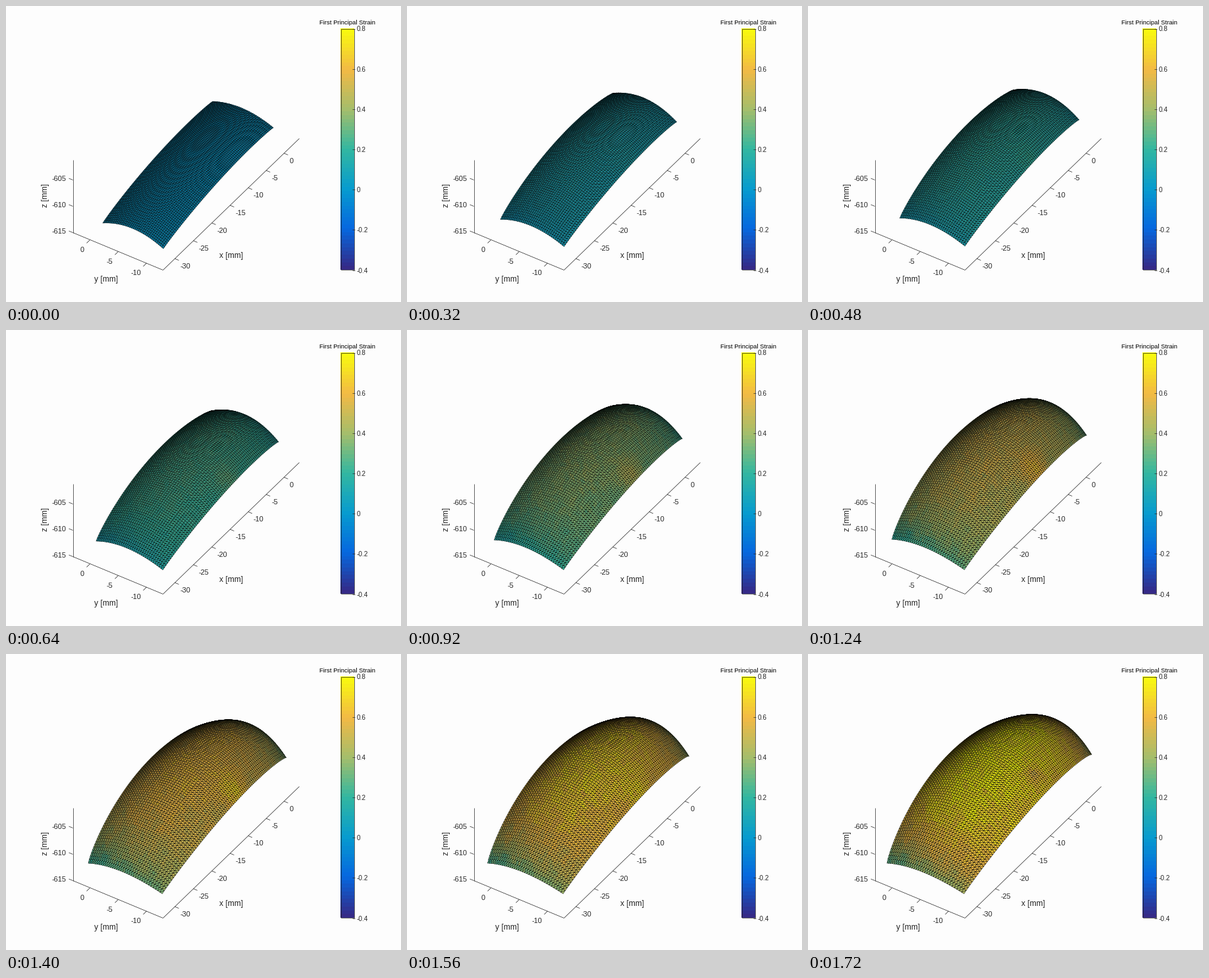
A matplotlib script for the animation above (1760 ms loop, 600 by 450 pixels).

```python
import numpy as np
import matplotlib.pyplot as plt
from matplotlib.animation import FuncAnimation
from matplotlib.collections import PolyCollection
from matplotlib.colors import LinearSegmentedColormap
from matplotlib.patches import Rectangle

W, H, DPI = 600, 450, 100
FRAMES, STEP = 44, 40
INK = "#262626"
NS, NV = 84, 36          # cells along and across the sheet

parula = LinearSegmentedColormap.from_list("parula", [
    "#352a87", "#0668e0", "#079ccf", "#33b8a1", "#a5be6b", "#f3ba45",
    "#f9fb0e"], N=64)

plt.rcParams["font.family"] = "Liberation Sans"
fig = plt.figure(figsize=(W / DPI, H / DPI), dpi=DPI, facecolor="#fdfdfd")
ax = fig.add_axes([0, 0, 1, 1])
ax.axis("off")


def px(n):
    return n * 72 / DPI


def line(x0, y0, x1, y1, width=0.7):
    ax.plot([x0 + .5, x1 + .5], [y0 + .5, y1 + .5], color=INK, lw=px(width),
            solid_capstyle="butt")


def label(x, y, s, size=11, ha="center", va="center_baseline", **kw):
    kw.setdefault("color", INK)
    ax.text(x, y, s, fontsize=px(size), ha=ha, va=va, **kw)


def draw_axes():
    line(101, 233, 101, 344)
    line(101, 344, 238, 401)
    line(238, 401, 445, 201)
    for i in range(7):
        x = 256 + 28.3 * i - 0.11 * i * i
        y = 401 - (x - 238) * 200 / 207
        line(x, y, x + 6, y + 2.5)
        label(x + 8.5, y + 11.5, f"{5 * i - 30}", ha="left")
    for i in range(3):
        x, y = 127 + 43 * i, 355 + 17.7 * i
        line(x, y, x - 5, y + 5)
        label(x - 8, y + 15, f"{-5 * i}", ha="right")
        z = 264 + 40 * i
        line(101, z, 95, z - 2.5)
        label(92, z - 2, f"{-605 - 5 * i}", ha="right")
    label(342, 379, "x [mm]", 12)
    label(152, 415, "y [mm]", 12)
    label(59.5, 288, "z [mm]", 12, va="center", rotation=90)


def draw_colorbar():
    x0, x1, y0, y1 = 508, 529, 34, 401
    ax.imshow(np.linspace(.8, -.4, 64)[:, None], cmap=parula, aspect="auto",
              extent=(x0, x1, y1, y0), interpolation="nearest")
    ax.add_patch(Rectangle((x0 + .5, y0 + .5), x1 - x0 - 1, y1 - y0 - 1,
                           fill=False, ec=INK, lw=px(.7)))
    for i in range(7):
        y = y0 + i * (y1 - y0) / 6
        line(x1 - 4, y, x1, y)
        label(533, y + .5, f"{(4 - i) / 5:g}", 10, ha="left")
    label(519, 25, "First Principal Strain", 9.5, color="black")


def ease_out(t, power):
    return 1 - (1 - t) ** power


def mix(q, a, b):
    return a + (b - a) * q


s, v = np.meshgrid(np.linspace(0, 1, NS + 1), np.linspace(0, 1, NV + 1),
                   indexing="ij")
arc_s, arc_v = (4 * s * (1 - s)) ** .85, 4 * v * (1 - v)


def surface(t):
    """Screen position of every mesh node."""
    q = t ** .83
    a = np.array([147 - 27 * t, 330 - 12 * ease_out(t, 3)])
    b = np.array([239 - 2 * t, 369 - 4.5 * ease_out(t, 6)])
    c = np.array([406 + 25 * t ** 1.15, 185 - 32 * t ** .77])
    d = a + c - b + (2 * q, -1 - 6 * q)

    S, V = s[..., None], v[..., None]
    p = (1 - S) * ((1 - V) * a + V * b) + S * ((1 - V) * d + V * c)
    lift = (mix(q, 11, 40) * arc_s
            + (mix(q, 11, 15) * (1 - s) + mix(q, 9, 21) * s) * arc_v
            + 14 * q * arc_s * arc_v)
    side = mix(q, .5, 15.5) * (2 * v - 1) * arc_s
    ends = 7 * q * (2 * s - 1) * arc_v
    p[..., 0] += .93 * side + .72 * ends
    p[..., 1] += .37 * side - .70 * ends - lift
    return p


rng = np.random.default_rng(4)
cs = (np.arange(NS)[:, None] + .5) / NS
cv = (np.arange(NV)[None, :] + .5) / NV
grain = rng.normal(0, 1, (NS, NV))
grain = (grain + np.roll(grain, 1, 0) + np.roll(grain, 1, 1)) / 1.7


def blob(s0, v0, ws, wv):
    return np.exp(-((cs - s0) / ws) ** 2 - ((cv - v0) / wv) ** 2)


def strain(t):
    level = .77 * t ** 1.15
    fade = 1 - (.65 - .25 * cv) * np.exp(-cs / .11) - .4 * np.exp((cs - 1) / .1)
    e = level * fade * (1 - .12 * (2 * cv - 1) ** 2)
    e = e + .16 * np.sin(np.pi * t * t) * blob(.56, .93, .07, .13)
    e = e - .16 * t ** 16 * blob(.58, .85, .04, .07)
    return e + .04 * level * grain


def triangles(p):
    """Two triangles per cell, ordered from the far corner to the near one."""
    p00, p01, p10, p11 = p[:-1, :-1], p[:-1, 1:], p[1:, :-1], p[1:, 1:]
    far = np.stack([p10, p11, p00], axis=2)
    near = np.stack([p11, p01, p00], axis=2)
    return np.stack([far, near], axis=2)[::-1].reshape(-1, 3, 2)


draw_axes()
draw_colorbar()
ax.set_xlim(0, W)
ax.set_ylim(H, 0)
mesh = PolyCollection(triangles(surface(0)), cmap=parula, edgecolors="black",
                      linewidths=px(.45), zorder=5)
mesh.set_clim(-.4, .8)
ax.add_collection(mesh, autolim=False)


def update(k):
    t = k / (FRAMES - 1)
    mesh.set_verts(triangles(surface(t)))
    mesh.set_array(np.repeat(strain(t)[::-1].ravel(), 2))
    return mesh,


anim = FuncAnimation(fig, update, frames=FRAMES, interval=STEP,
                     init_func=lambda: update(0), repeat=True, repeat_delay=0)
plt.show()
```
